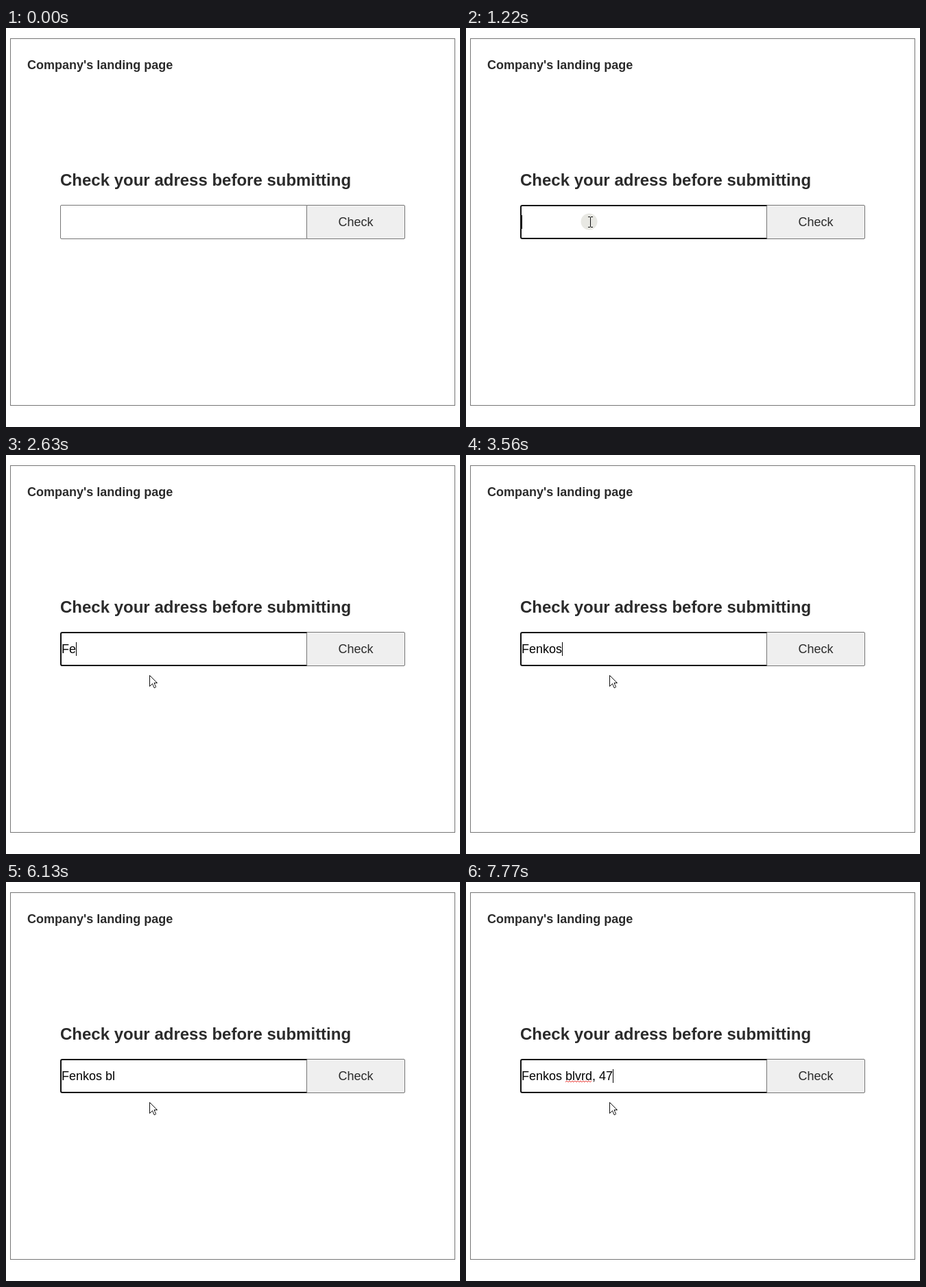
An HTML page that plays this animation: 662x582 px, repeating every 8000 ms.

```html
<!DOCTYPE html>
<html lang="en">
<head>
<meta charset="utf-8">
<title>Address check</title>
<style>
  html, body { margin: 0; width: 100%; height: 100%; overflow: hidden; background: #fff; }
  svg { display: block; }
  text { font: 18px "Liberation Sans", Arial, sans-serif; fill: #2b2b2b; white-space: pre; }
  .bold { font-weight: bold; }
  .big { font-size: 24px; }
  #typed { fill: #000; }
  .line { fill: none; stroke: #767676; }
  .button { fill: #efefef; }
</style>
</head>
<body>
<svg width="662" height="582" viewBox="0 0 662 582">
  <rect class="line" x="6.5" y="15.5" width="648" height="535"/>
  <text class="bold" x="31" y="60">Company's landing page</text>
  <text class="bold big" x="79" y="230">Check your adress before submitting</text>

  <rect id="idle" class="line" x="79.5" y="258.5" width="360" height="49" rx="1.5"/>
  <rect id="focus" x="80" y="259" width="360" height="48" rx="2" fill="none" stroke="#101010" stroke-width="2"/>
  <rect class="line button" x="438.5" y="258.5" width="143" height="49" rx="1.5"/>
  <text x="510" y="289" text-anchor="middle">Check</text>

  <text id="typed" x="81" y="289"></text>
  <path id="squiggle" fill="none" stroke="#e8413c"/>
  <rect id="caret" y="273" width="1" height="20"/>

  <g id="pointer">
    <circle id="ripple" cx="-1.5" cy="-.5" r="12" fill="#e8e8e3"/>
    <path id="beam" d="M-3-7.5h3M1-7.5h3M.5-7V7M-3 7.5h3M1 7.5h3" fill="none" stroke="#111"/>
    <path id="arrow" d="M.5.5V16.5L4.5 12.5 7 18.5H8.5L9.5 17 7 11.5H11.5Z" fill="#fff" stroke="#111"/>
  </g>
</svg>
<script>
const LOOP = 8000, BLINK = 520, STEP = 80;
const ENTER = 120, CLICK = 1060, FOCUS = 1160;
const address = "Fenkos blvrd, 47";
const misspelt = address.indexOf(",") + 1;

// Typing comes in bursts of evenly spaced keys
const burst = (start, count, gap) => Array.from({ length: count }, (_, i) => start + i * gap);
const keyTimes = [...burst(2320, 7, 232), ...burst(4410, 2, 160), ...burst(6220, 7, 258)];

const el = id => document.getElementById(id);
const [idle, focus, typed, squiggle, caret, pointer, ripple, beam, arrow] =
  ["idle", "focus", "typed", "squiggle", "caret", "pointer", "ripple", "beam", "arrow"].map(el);
const show = (node, on) => node.setAttribute("visibility", on ? "visible" : "hidden");
const progress = (t, from, to) => Math.min(1, Math.max(0, (t - from) / (to - from)));

squiggle.setAttribute("d", "M145 292" + "l2-2 2 2".repeat(9) + "l2-2");

// Enter from below, settle on the field, then leave; sampled like a screen recording
function pointerAt(t) {
  const time = 20 + STEP * Math.floor((t - 20) / STEP);
  const enter = progress(time, ENTER, 580);
  const settle = progress(time, 800, CLICK);
  const leave = progress(time, 1380, 1700);
  return [236 - 53 * enter - 2 * settle + 28 * leave,
          388 - 119 * enter + 14 * settle + 38 * leave].map(Math.round);
}

function draw(t) {
  const [x, y] = pointerAt(t);
  const entered = t >= ENTER;
  const overField = entered && y < 308;
  const focused = t >= FOCUS;

  show(idle, !focused);
  show(focus, focused);
  idle.style.stroke = overField ? "#444" : "#767676";

  const count = keyTimes.filter(time => time <= t).length;
  typed.textContent = address.slice(0, count);
  show(squiggle, count > misspelt);

  const lastInput = count ? keyTimes[count - 1] : FOCUS;
  const width = count ? typed.getComputedTextLength() : 0;
  caret.setAttribute("x", 81 + Math.round(width));
  show(caret, focused && Math.floor((t - lastInput) / BLINK) % 2 === 0);

  pointer.setAttribute("transform", `translate(${x} ${y})`);
  show(ripple, t >= CLICK && t < CLICK + 3 * STEP);
  show(beam, overField);
  show(arrow, entered && !overField);
}

const begin = performance.now();
function tick() {
  draw((performance.now() - begin) % LOOP);
  requestAnimationFrame(tick);
}
tick();
</script>
</body>
</html>
```
